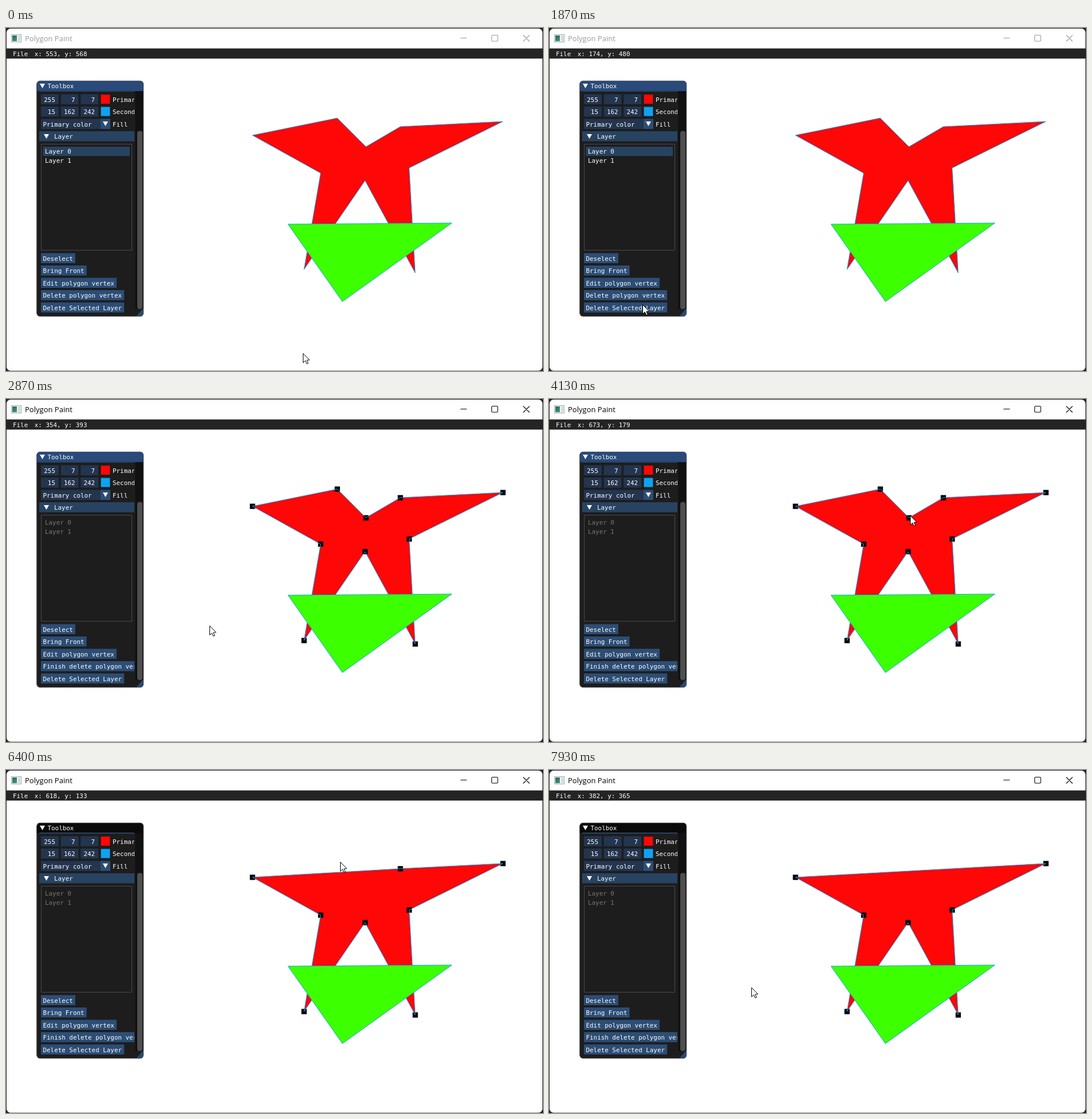
Write an HTML page with a canvas that moves like this. It is 937 px wide and 598 px high and loops after 8000 ms.

```html
<!DOCTYPE html>
<html lang="en">
<head>
<meta charset="utf-8">
<title>Polygon Paint</title>
<style>
html, body { margin: 0; width: 100%; height: 100%; overflow: hidden; background: #222; }
canvas { display: block; }
</style>
</head>
<body>
<canvas id="stage" width="937" height="598"></canvas>
<script>
const ctx = document.getElementById('stage').getContext('2d');
const LOOP = 8000, STEP = 1000 / 15, SCALE = 1.0676;
const MONO = '10.89px "DejaVu Sans Mono", monospace';
const PITCH = 21.5, ROW = 17.5, CHAR = 6.557;
const FIELD = '#23354f', BUTTON = '#2c4d75', HEADER = '#284361';

// Events, in steps of 1/15 s
const FOCUS = 33, PRESS = 34, EDIT = 36, LEAVE = 42, BLUR = 65;

// Pointer moves: first step, last step, goal x, y, ease-out power
const home = [518.2, 567.2];
const moves = [
  [1, 5, 517.2, 544], [12, 15, 213, 494, 2], [18, 25, 163.2, 485, 2],
  [27, 28, 163, 482], [28, 29, 150, 467.5], [41, 43, 355, 395, 3],
  [43, 53, 624, 196], [54, 55, 628.6, 196], [60, 61, 630.42, 203],
  [77, 78, 626.6, 203], [78, 88, 579, 160], [95, 96, 583, 160],
  [96, 102, 752, 168], [102, 108, 690, 172.4], [116, 118, 358.6, 376.8, 2],
  [118, 119, 353, 379]
];

// Vertices: x, y, step of removal
const star = [
  [430, 187], [578, 157, 90], [628, 207, 66], [688, 172, 112], [867, 163],
  [703.5, 244], [714, 427], [626.5, 266], [520, 421], [549, 253]
];
const triangle = [[492, 342], [778, 340], [587, 477]];
const arrow = [[0, 0], [0, 16], [3.8, 12.6], [6.4, 18], [8.8, 17], [6.3, 11.7], [11, 11.3]];

const mix = (a, b, u) => a.map((v, i) => v + (b[i] - v) * u);

function pointer(k) {
  let pos = home;
  for (const [from, to, x, y, power = 1] of moves) {
    if (k <= from) break;
    const u = Math.min(1, (k - from) / (to - from));
    pos = mix(pos, [x, y], 1 - (1 - u) ** power);
  }
  return pos;
}

function box(x, y, r, b, color) {
  ctx.fillStyle = color;
  ctx.fillRect(x, y, r - x, b - y);
}

function round(x, y, r, b, radius) {
  ctx.beginPath();
  ctx.roundRect(x, y, r - x, b - y, radius);
}

function text(s, x, y, color = '#fff', font = MONO) {
  ctx.font = font;
  ctx.fillStyle = color;
  ctx.fillText(s, x, y);
}

function trace(points, dx = 0, dy = 0) {
  ctx.beginPath();
  points.forEach(p => ctx.lineTo(p[0] + dx, p[1] + dy));
  ctx.closePath();
}

function fill(color) {
  ctx.fillStyle = color;
  ctx.fill();
}

function stroke(color, width = 1) {
  ctx.strokeStyle = color;
  ctx.lineWidth = width;
  ctx.stroke();
}

function downArrow(x, y) {
  trace([[x, y], [x + 9, y], [x + 4.5, y + 8]]);
  fill('#fff');
}

function drawWindow(k) {
  box(0, 0, 937, 598, '#222');
  round(1, 1, 936, 597.5, 7);
  fill('#fff');

  box(9, 11, 27, 25, '#a3a8ab');
  box(10, 12, 26, 24, '#f4f6f6');
  const teal = ctx.createLinearGradient(11, 13, 19, 23);
  teal.addColorStop(0, '#2c6470');
  teal.addColorStop(1, '#3f9a72');
  box(11, 13, 19, 23, teal);
  box(21, 13, 25, 23, '#d4dadd');

  const ink = k < FOCUS ? '#999' : '#000';
  text('Polygon Paint', 33, 23, ink, '13px "Open Sans", sans-serif');
  ctx.beginPath();
  ctx.moveTo(793, 17.5); ctx.lineTo(804, 17.5);
  ctx.moveTo(902.5, 12.5); ctx.lineTo(913.5, 23.5);
  ctx.moveTo(913.5, 12.5); ctx.lineTo(902.5, 23.5);
  ctx.roundRect(847.5, 12.5, 10.5, 10.5, 1.5);
  stroke(ink, 1.1);

  box(0, 35.6, 937, 53.3, '#242424');
  text('File', 12, 49);
  // the readout trails the pointer
  const [x, y] = mix(pointer(k - 1), pointer(k), 0.1);
  text(`x: ${Math.floor(x * SCALE)}, y: ${Math.floor((y - 35) * SCALE)}`, 49.8, 49);
}

function drawShape(points, color, handles) {
  trace(points);
  fill(color);
  if (handles) points.forEach(([x, y]) => box(x - 4.5, y - 4.5, x + 4.7, y + 4.7, '#000'));
  trace(points);
  stroke('#0fa2f2');
}

function drawColorRow(y, rgb, label) {
  rgb.forEach((v, i) => {
    const x = 61 + i * 34.6;
    box(x, y, x + 31, y + ROW, FIELD);
    text(String(v).padStart(3), x + 5.3, y + 13);
  });
  box(165.6, y + 0.6, 181.4, y + ROW - 1, `rgb(${rgb})`);
  text(label, 186, y + 13);
}

function drawToolbox(k) {
  const editing = k >= EDIT;
  ctx.save();
  round(53.5, 92, 240, 503, 6);
  ctx.save();
  ctx.clip();
  box(53, 92, 240, 503, '#1d1d1d');
  box(53, 92, 240, 110, k < BLUR ? '#294a7a' : '#0a0a0a');
  box(58, 109, 224, 111, HEADER);
  box(225.5, 110, 240, 490, '#111');
  trace([[240, 488], [240, 503], [227, 503]]);
  fill('#264a70');
  round(229, 179.5, 238, 490, 4);
  fill('#4f4f4f');
  ctx.restore();
  round(53.7, 92.3, 239.8, 502.7, 6);
  stroke('#50505a');
  downArrow(59, 97);
  text('Toolbox', 72.5, 105);

  ctx.beginPath();
  ctx.rect(54, 110, 170, 392);
  ctx.clip();
  drawColorRow(115.5, [255, 7, 7], 'Primary color');
  drawColorRow(115.5 + PITCH, [15, 162, 242], 'Secondary color');

  box(61, 158.5, 165, 176, FIELD);
  box(165, 158.5, 182, 176, BUTTON);
  text('Primary color', 64.5, 171.5);
  downArrow(169, 163);
  text('Fill', 186, 171.5);

  box(58, 180, 224, 197.5, HEADER);
  downArrow(66, 185);
  text('Layer', 84, 193);

  ctx.beginPath();
  ctx.rect(61.5, 202.5, 158, 185);
  stroke('#4a4a50');
  if (!editing) box(64.5, 207, 216, 223, HEADER);
  for (let i = 0; i < 2; i++) text(`Layer ${i}`, 68, 219 + 16 * i, editing ? '#777' : '#fff');

  const labels = ['Deselect', 'Bring Front', 'Edit polygon vertex',
    `${editing ? 'Finish delete' : 'Delete'} polygon vertex`, 'Delete Selected Layer'];
  labels.forEach((label, i) => {
    const y = 392.5 + i * PITCH;
    const hovered = i === 3 && k >= FOCUS && k < LEAVE;
    const pressed = k >= PRESS && !editing;
    const color = !hovered ? BUTTON : pressed ? '#0f87fa' : '#4296fa';
    box(61, y, 68.5 + label.length * CHAR, y + ROW, color);
    text(label, 64.5, y + 13);
  });
  ctx.restore();
}

function drawPointer([x, y]) {
  trace(arrow, Math.round(x) + 0.5, Math.round(y) + 0.5);
  fill('#fff');
  stroke('#000');
}

function draw(now) {
  const k = Math.min(119, Math.floor((now % LOOP + 3.4) / STEP));
  drawWindow(k);
  drawShape(star.filter(p => !(k >= p[2])), '#ff0707', k >= EDIT);
  drawShape(triangle, '#3cff00');
  drawToolbox(k);
  drawPointer(pointer(k));
}

let start;
function tick(now) {
  start ??= now;
  draw(now - start);
  requestAnimationFrame(tick);
}
draw(0);
requestAnimationFrame(tick);
</script>
</body>
</html>
```
